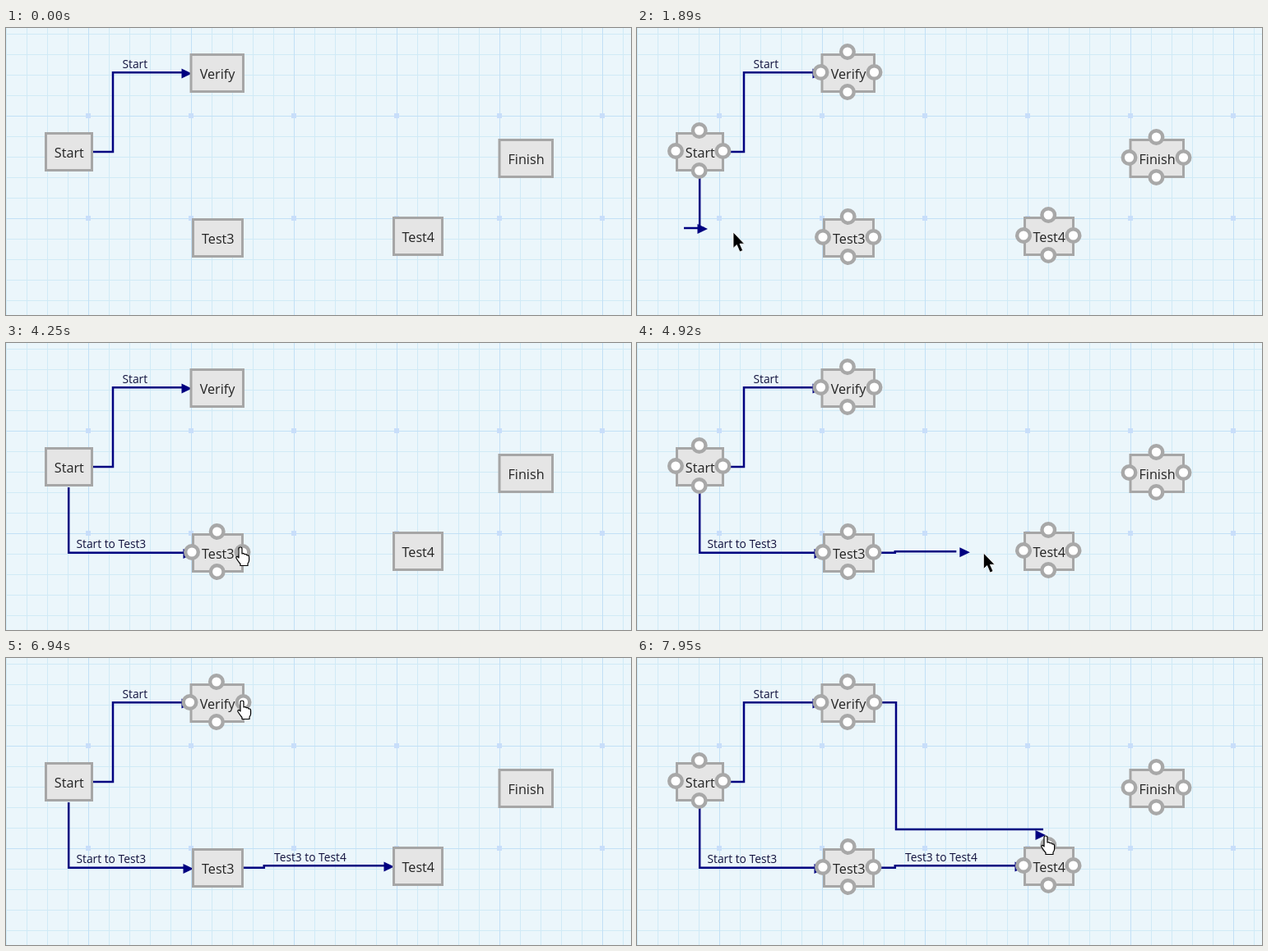
An HTML page that plays this animation: 760x350 px, repeating every 8000 ms.

```html
<!DOCTYPE html>
<html lang="en">
<head>
<meta charset="utf-8">
<title>Connecting flow steps</title>
<style>
  html, body { margin: 0; width: 100%; height: 100%; overflow: hidden; background: #ebf6fb; }
  svg { display: block; width: 760px; height: 350px; font-family: "Open Sans", "Noto Sans", sans-serif; }
  .minor { fill: #d0eaf6; }
  .major { fill: #c2e0f6; }
  .dot { fill: #c8defa; }
  .line { fill: none; stroke: #000080; stroke-width: 2.5; }
  .tip { fill: #000080; }
  .label { font-size: 13.8px; fill: #10103c; }
  .box { fill: #e5e5e5; stroke: #a6a6a6; stroke-width: 3; }
  .name { font-size: 16.2px; fill: #222; text-anchor: middle; }
  .port { fill: #fff; stroke: #a8a8a8; stroke-width: 4.4; }
  .arrow { fill: #000; stroke: #fff; stroke-width: .8; }
  .hand { fill: #fff; stroke: #000; stroke-width: 1.2; stroke-linejoin: round; }
</style>
</head>
<body>
<svg id="stage" viewBox="0 0 760 350"></svg>
<script>
const LOOP = 8000, STUB = 25, REACH = 12;
const stage = document.getElementById('stage');

function add(parent, tag, attrs, text) {
  const el = document.createElementNS('http://www.w3.org/2000/svg', tag);
  for (const k in attrs) el.setAttribute(k, attrs[k]);
  if (text) el.textContent = text;
  return parent.appendChild(el);
}
const group = () => add(stage, 'g', {});
const show = (el, on) => el.setAttribute('visibility', on ? 'visible' : 'hidden');
const poly = pts => 'M' + pts.map(p => p.join(' ')).join('L');

// Grid
function gridLines(step, cls) {
  for (let x = 100 % step; x < 760; x += step) add(stage, 'rect', { x, y: 0, width: 1, height: 350, class: cls });
  for (let y = 107 % step; y < 350; y += step) add(stage, 'rect', { x: 0, y, width: 760, height: 1, class: cls });
}
gridLines(25, 'minor');
gridLines(125, 'major');
for (let x = 100; x < 760; x += 125)
  for (const y of [107, 232]) add(stage, 'rect', { x: x - 3, y: y - 3, width: 6, height: 6, class: 'dot' });

// Links
const tipPath = (x, y) => `M${x - 12.5} ${y - 6}L${x} ${y}L${x - 12.5} ${y + 6}Z`;
function addLink(from, d, tip, text, x, y) {
  const g = group();
  add(g, 'path', { d, class: 'line' });
  add(g, 'path', { d: tipPath(...tip), class: 'tip' });
  add(g, 'text', { x, y, class: 'label' }, text);
  return { from, g };
}
const links = [
  addLink(0, 'M106 151H130V54.2H216', [226, 55.5], 'Start', 141.5, 49),
  addLink(2980, 'M76.2 176V255.8H218', [228, 257], 'Start to Test3', 85.5, 249.5),
  addLink(5610, 'M289 255.8H313.8V253.2H462', [472, 254.5], 'Test3 to Test4', 326, 247.5)
];

// Link being dragged: time span, start point, x of the first corner
const drags = [
  { from: 1610, to: 2980, x: 76.2, y: 175, bend: 76.2 },
  { from: 4330, to: 5610, x: 288, y: 255.8, bend: 313.8 },
  { from: 7170, to: LOOP, x: 289, y: 54.2, bend: 315 }
];
const dragG = group();
const dragLine = add(dragG, 'path', { class: 'line' });
const dragTip = add(dragG, 'path', { class: 'tip' });

// Nodes
function addNode(name, x, y, w) {
  const h = 48, cx = x + w / 2;
  add(stage, 'rect', { x: x + 1.5, y: y + 1.5, width: w - 3, height: h - 3, class: 'box' });
  add(stage, 'text', { x: cx + .3, y: y + 31, class: 'name' }, name);
  const g = group();
  const ports = [[x, y + 23], [x + w - 1.5, y + 23], [cx - .8, y - 2], [cx - .8, y + h - 1]];
  for (const [px, py] of ports) add(g, 'circle', { cx: px, cy: py, r: 7.8, class: 'port' });
  return { x, y, w, h, ports, g };
}
const nodes = [
  addNode('Start', 47, 127, 59),
  addNode('Verify', 223.5, 31, 66.5),
  addNode('Test3', 226, 232, 63),
  addNode('Test4', 470, 230, 62),
  addNode('Finish', 598.5, 135, 67.5)
];

// Cursors, both with the hot spot at 0,0
const cursor = group();
const arrow = add(cursor, 'path', { class: 'arrow', d: 'M0 0V19.5L4.3 15.5L8 24L11.6 22.3L8 14.2H13.6Z' });
const hand = add(cursor, 'path', {
  class: 'hand',
  d: 'M-2 2Q-2 0 0 0Q2 0 2 2V8Q4 6.8 5.2 8.8Q7.2 7.8 8 10Q10.6 9.4 10.6 12V16Q10.6 18 9 20V22.5H0V20.5' +
     'Q-2.5 17.5-5 13.5Q-5.5 11.5-4 11.4Q-3 11.5-2 13Z'
});

// Moments at which the picture refreshes: [first, last, steps]
const ticks = [
  [70, 650, 9], [820, 960, 3], [1130, 1350, 4], [1610, 2040, 7], [2240, 2520, 5], [2670, 2820, 3],
  [2980, 3520, 8], [3680, 3830, 3], [4070, 4070, 1], [4250, 5000, 10], [5080, 5400, 5],
  [5610, 6240, 9], [6470, 6780, 5], [6940, 6940, 1], [7170, 7950, 11]
].flatMap(([a, b, n]) =>
  Array.from({ length: n }, (_, i) => Math.floor((a + (n > 1 ? (b - a) * i / (n - 1) : 0)) / 10) * 10));

// Pointer route: [time, x, y]
const route = [
  [70, 262, 275], [215, 232, 262], [430, 140, 215], [650, 90, 168],
  [890, 96, 178], [1130, 92, 177], [1350, 74, 176], [1610, 71, 178],
  [1680, 36, 222], [1750, 82, 244], [1820, 86, 245], [1890, 117, 249],
  [2040, 190, 247], [2380, 258, 251], [2520, 212, 249], [2670, 216, 250.5],
  [2740, 223, 251], [2820, 223, 250], [2980, 223, 250], [3680, 282, 256],
  [3750, 300, 258], [3830, 284, 249], [4250, 285, 249], [5000, 440, 257],
  [5240, 464, 252], [5400, 466, 248], [5610, 466, 248], [6240, 297, 64],
  [6470, 294, 64], [6780, 286, 51], [6940, 287, 52], [7170, 287, 52],
  [7330, 340, 90], [7710, 485, 200], [7790, 494, 209], [7870, 497, 216],
  [7950, 497, 217]
];
function pointer(t) {
  const i = route.findIndex(k => k[0] >= t);
  if (i < 1) return route[0].slice(1);
  const a = route[i - 1], b = route[i], p = (t - a[0]) / (b[0] - a[0]);
  return [a[1] + (b[1] - a[1]) * p, a[2] + (b[2] - a[2]) * p];
}

const onPort = (n, x, y) => n.ports.some(p => Math.hypot(p[0] - x, p[1] - y) < REACH);
const inside = (n, x, y) => x >= n.x && x <= n.x + n.w && y >= n.y && y <= n.y + n.h;

function draw(i) {
  const t = i < 0 ? 0 : ticks[i];
  const [x, y] = pointer(t);
  const drag = drags.find(d => t >= d.from && t < d.to);

  for (const l of links) show(l.g, t >= l.from);
  for (const n of nodes) show(n.g, drag || (i >= 0 && (inside(n, x, y) || onPort(n, x, y))));

  show(dragG, drag);
  if (drag) {
    // The arrowhead trails the pointer by one refresh, the line by two
    const [ex, ey] = pointer(ticks[i - 2]);
    dragLine.setAttribute('d', poly([
      [drag.x, drag.y], [drag.bend, drag.y], [drag.bend, ey], [ex - STUB, ey], [ex, ey]
    ]));
    dragTip.setAttribute('d', tipPath(...pointer(ticks[i - 1])));
  }

  const pointing = nodes.some(n => onPort(n, x, y));
  cursor.setAttribute('transform', `translate(${x} ${y})`);
  show(hand, i >= 0 && pointing);
  show(arrow, i >= 0 && !pointing);
}

const start = performance.now();
let last = null;
function frame() {
  const t = (performance.now() - start) % LOOP;
  const i = ticks.filter(k => k <= t).length - 1;
  if (i !== last) draw(last = i);
  requestAnimationFrame(frame);
}
frame();
</script>
</body>
</html>
```
